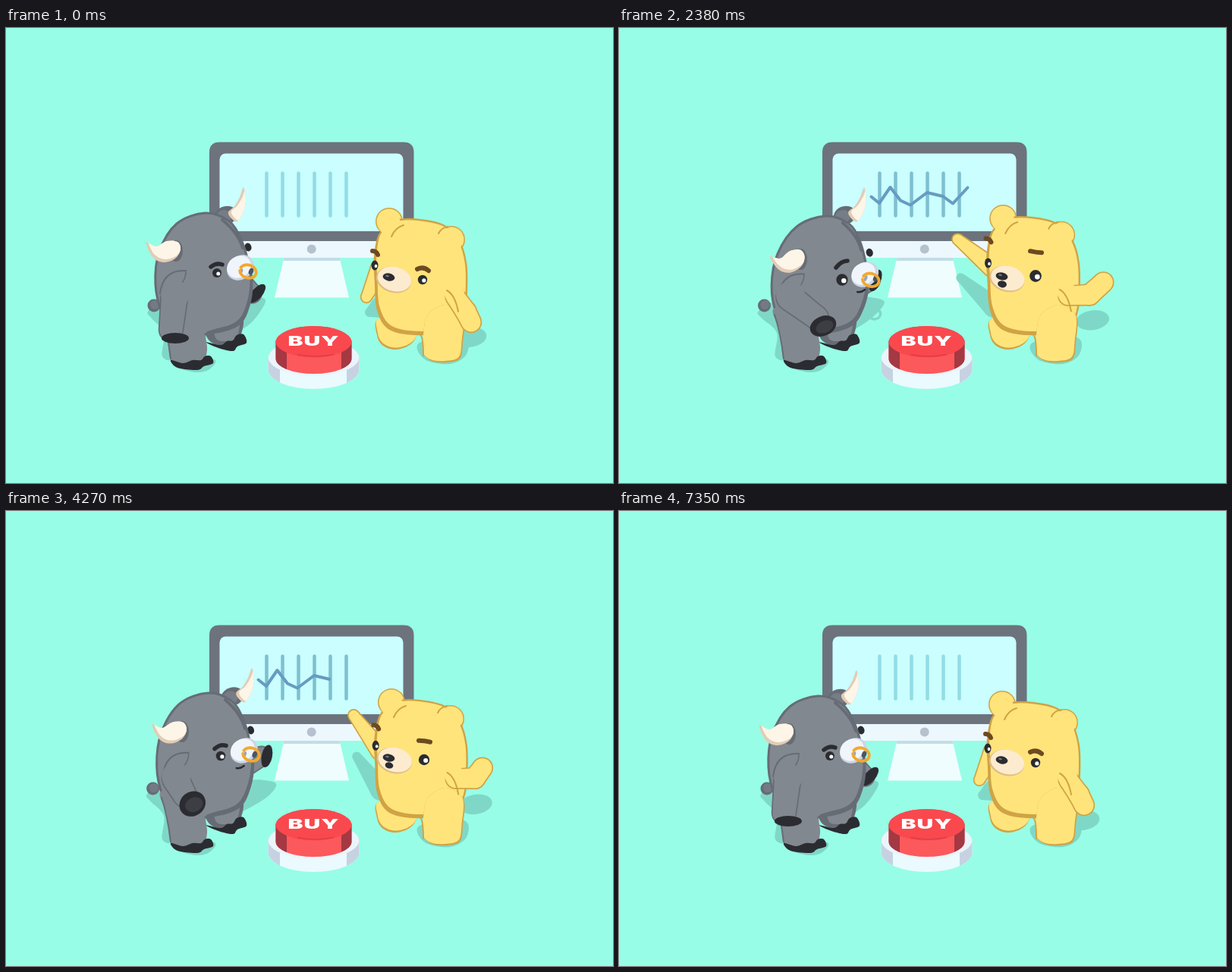
Recreate the animation shown at these times as an HTML page with a canvas. Size 800 by 600 pixels, loop 7420 ms.

```html
<!DOCTYPE html>
<html lang="en">
<head>
<meta charset="utf-8">
<title>Bull and bear</title>
<style>
html, body { margin: 0; width: 100%; height: 100%; overflow: hidden; background: #98fde6; }
svg, canvas { position: absolute; left: 0; top: 0; width: 800px; height: 600px; display: block; }
text { font: 900 30px Inter, "Open Sans", sans-serif; letter-spacing: 1px; }
</style>
</head>
<body>
<svg viewBox="0 0 800 600">
  <defs>
    <clipPath id="baseClip"><path d="M345.500 436a60 26 0 0 1 120 0v14a60 26 0 0 1-120 0z"/></clipPath>
    <clipPath id="capClip"><path d="M355.500 414a50 21 0 0 1 100 0v22a50 20 0 0 1-100 0z"/></clipPath>
  </defs>
  <path d="M367 300h72l13 55.500h-98z" fill="#effdff"/>
  <path d="M366.500 302h73l1.200 5h-75.300z" fill="#c3dde6"/>
  <path d="M268 279h269.500v12q0 12-12 12h-245.500q-12 0-12-12z" fill="#ecf8fe"/>
  <path d="M268 281v-117q0-13.500 13.500-13.500h242.500q13.500 0 13.500 13.500v117z" fill="#6c737d"/>
  <rect x="281.500" y="165.500" width="242" height="102.500" rx="8" fill="#cafeff"/>
  <circle cx="402.700" cy="291.500" r="6" fill="#b6c1ce"/>
  <path id="bars" d="M343.500 191.500v56M364.500 191.500v56M385.500 191.500v56M406.500 191.500v56M427.500 191.500v56M448.500 191.500v56" stroke-width="4.500" stroke-linecap="round"/>
  <path id="line" pathLength="1" d="M332.500 222.500L343 231L357.500 210L371 227.500L384 233.500L406 217L427 222L440 231.500L459.500 210.500" fill="none" stroke="#659cc0" stroke-width="4" stroke-linecap="round" stroke-linejoin="round"/>
  <g clip-path="url(#baseClip)">
    <path d="M345 405h121v75h-121z" fill="#eafaff"/>
    <path d="M345 405h16v75h-16zM449 405h17v75h-17z" fill="#c6d2e2"/>
    <ellipse cx="405.500" cy="434" rx="60" ry="24.500" fill="#eaf4fb"/>
  </g>
  <g clip-path="url(#capClip)">
    <path d="M355 390h101v70h-101z" fill="#fb595c"/>
    <path d="M355 410l15 18v30h-15zM456 410l-14 18v30h14z" fill="#a43843"/>
    <ellipse cx="405.500" cy="413.500" rx="50" ry="21" fill="#f9494e"/>
    <path d="M384 430.500q23 5 48 0" fill="none" stroke="#e03d47" stroke-width="1.500"/>
  </g>
  <text transform="translate(405.500 418.500) scale(1 .6)" text-anchor="middle" fill="#fff">BUY</text>
</svg>
<canvas id="stage" width="800" height="600"></canvas>
<script>
const LOOP = 7420, STEP = 70, END = 7350;
const ctx = document.getElementById('stage').getContext('2d');
const bars = document.getElementById('bars'), line = document.getElementById('line');

const GRAY = '#82888f', SLATE = '#666c75', INK = '#2b2c31';
const YELLOW = '#ffe47b', OCHRE = '#d0a345', SHADOW = '#7fd8c7';
const CREAM = '#fdf5e8', TAN = '#e2ccb6', BROWN = '#6d4a20';

// time, body x y, face x y, brow lift, left horn x y turn, right horn x y turn
const bullHead = [
  [0, 0, 0, 0, 0, -10, 0, 0, 0, 0, 0, 0],
  [980, 10, 4, 8, 19, -8, 18, 9, 0, 18, 0, .28],
  [1400, 12, 6, 9, 20, -8, 19, 10, 0, 19, 1, .3],
  [2380, 10, 4, 16, 9, -21, 15, 11, -.2, 9, 0, .03],
  [2700, 9, 3, 15, 8, -20, 14, 9, -.18, 9, 0, .03],
  [3360, 5, -7, 5, -2, -15, 8, -5, -.08, 10, -6, .03],
  [4300, 4, -4, 5, 0, -12, 8, -3, -.04, 10, -3, .03],
  [5180, 4, 0, 5, 5, -4, 10, 2, 0, 12, 1, .05],
  [5550, 8, 3, 8, 16, -8, 15, 7, 0, 16, 1, .22],
  [6160, 2, 1, 4, 4, -8, 6, 1, 0, 8, 1, .02]
];
// time, near hoof x y height, far hoof x y
const bullArms = [
  [0, 223, 409, 7, 331, 350],
  [980, 223, 409, 7, 331, 346],
  [1550, 223, 409, 7, 331, 346],
  [2380, 269, 393, 13, 338, 333],
  [3360, 249, 381, 17, 348, 319],
  [4200, 246, 386, 16, 344, 323],
  [5180, 232, 399, 12, 332, 340],
  [6160, 225, 407, 8, 331, 348]
];
// time, body x y, left ear x y, right ear x y, face x y, snout y, brow lift, mouth
const bearHead = [
  [0, 0, 0, 0, 0, 0, 0, 0, 0, 0, -15, 0],
  [1550, 0, 0, 0, 0, 0, 0, 0, 0, 0, -15, 0],
  [2250, -1, -3, 1, -4, -4, -6, 0, -5, -1, -32, 1],
  [2700, 0, -3, 2, -4, -3, -7, 0, -5, -2, -31, 1],
  [3360, 2, -4, 5, -5, 0, -7, 2, -6, -5, -26, 1],
  [4250, 1, -3, 3, -3, -1, -5, 2, -4, -3, -25, .9],
  [5180, -8, 3, -16, 14, -9, 9, 4, 9, 16, -6, .5],
  [6160, -5, 2, -12, 9, -7, 6, -1, 11, 13, -13, .4]
];
// time, far hand x y, near elbow x y, near hand x y
const bearArms = [
  [0, 475, 355, 606, 374, 613, 388],
  [1550, 475, 355, 606, 374, 613, 388],
  [2250, 446, 279, 620, 352, 638, 336],
  [2750, 448, 277, 621, 351, 640, 332],
  [3360, 460, 262, 610, 345, 610, 322],
  [4200, 458, 268, 618, 352, 628, 338],
  [5180, 474, 354, 609, 372, 620, 383],
  [6160, 475, 355, 607, 373, 615, 387]
];

const clamp = v => Math.max(0, Math.min(1, v));
const smooth = v => { v = clamp(v); return v * v * (3 - 2 * v); };

function pose(table, t) {
  const i = table.findLastIndex(row => row[0] <= t);
  const a = table[i], b = table[i + 1] || table[0];
  const u = smooth((t - a[0]) / ((table[i + 1] ? b[0] : END) - a[0]));
  return a.slice(1).map((v, k) => v + (b[k + 1] - v) * u);
}

// Leans the upper body while the feet stay put
const leaner = (bx, by) => ([x, y]) => {
  const w = clamp((400 - y) / 150);
  return [x + bx * w, y + by * w];
};
const mover = (x, y, turn = 0, cx = 0, cy = 0) => p => {
  const c = Math.cos(turn), s = Math.sin(turn), dx = p[0] - cx, dy = p[1] - cy;
  return [cx + x + dx * c - dy * s, cy + y + dx * s + dy * c];
};

function blob(points, map = p => p) {
  const pts = points.map(map), n = pts.length, path = new Path2D();
  path.moveTo(...pts[0]);
  for (let i = 0; i < n; i++) {
    const [a, b, c, d] = [n - 1, 0, 1, 2].map(k => pts[(i + k) % n]);
    path.bezierCurveTo(b[0] + (c[0] - a[0]) / 6, b[1] + (c[1] - a[1]) / 6,
      c[0] - (d[0] - b[0]) / 6, c[1] - (d[1] - b[1]) / 6, ...c);
  }
  path.closePath();
  return path;
}

function fill(path, color) { ctx.fillStyle = color; ctx.fill(path); }

function toon(path, light, dark, dx, dy, rim = 0) {
  fill(path, dark);
  ctx.save();
  ctx.clip(path);
  ctx.translate(dx, dy);
  fill(path, light);
  ctx.restore();
  if (rim) { ctx.strokeStyle = dark; ctx.lineWidth = rim; ctx.stroke(path); }
}

function oval(x, y, rx, ry, color, turn = 0) {
  ctx.fillStyle = color;
  ctx.beginPath();
  ctx.ellipse(x, y, rx, ry, turn, 0, 7);
  ctx.fill();
}

function stroke(points, color, width) {
  const [a, b, c] = points;
  ctx.strokeStyle = color;
  ctx.lineWidth = width;
  ctx.lineCap = 'round';
  ctx.beginPath();
  ctx.moveTo(...a);
  ctx.quadraticCurveTo(...b, ...c);
  ctx.stroke();
}

function link([x1, y1, r1], [x2, y2, r2], color) {
  oval(x1, y1, r1, r1, color);
  oval(x2, y2, r2, r2, color);
  const d = Math.hypot(x2 - x1, y2 - y1);
  if (d <= Math.abs(r1 - r2)) return;
  const a = Math.atan2(y2 - y1, x2 - x1), k = Math.acos((r1 - r2) / d);
  ctx.beginPath();
  for (const [x, y, r, s] of [[x1, y1, r1, k], [x2, y2, r2, k], [x2, y2, r2, -k], [x1, y1, r1, -k]])
    ctx.lineTo(x + r * Math.cos(a + s), y + r * Math.sin(a + s));
  ctx.fill();
}

function limb(joints, light, dark) {
  for (const [grow, color] of [[1.7, dark], [0, light]])
    for (let i = 1; i < joints.length; i++)
      link(...[joints[i - 1], joints[i]].map(([x, y, r]) => [x, y, r + grow]), color);
}

function eye(x, y, r) {
  oval(x, y, r, r, INK);
  oval(x + r * .3, y + r * .15, r * .42, r * .42, '#fff');
}

const bullBody = [[262, 244], [293, 254], [309, 277], [319, 307], [324, 335], [320, 366], [306, 391],
  [270, 402], [225, 401], [206, 376], [197, 338], [202, 295], [225, 258]];
const hornLeft = [[185, 283], [198, 288], [212, 281], [226, 282], [230, 292], [223, 304], [207, 309], [193, 302]];
const hornRight = [[313, 210], [316, 227], [313, 242], [305, 255], [297, 251], [293, 243], [301, 235], [308, 223]];

function drawBull(t) {
  const [bx, by, fx, fy, brow, hx, hy, hr, kx, ky, kr] = pose(bullHead, t);
  const [lx, ly, lr, rx, ry] = pose(bullArms, t);
  const lean = leaner(bx, by), tx = 195 - bx * .35;

  fill(blob([[tx - 8, 374], [205, 363], [225, 400], [222, 435], [206, 433], [208, 402], [tx - 3, 383]]), SHADOW);
  fill(blob([[312, 358], [rx + 10, 357 + bx * .2], [rx + 4, 374], [318, 393], [300, 397]]), SHADOW);
  ctx.strokeStyle = SHADOW;
  ctx.lineWidth = 3.5;
  ctx.beginPath();
  ctx.ellipse(319 + fx * 1.1, 377, 8, 7, 0, 0, 7);
  ctx.stroke();
  fill(blob([[228, 436], [274, 437], [268, 450], [250, 454], [226, 447]]), SHADOW);

  oval(tx, 366, 8.5, 8.5, SLATE);
  oval(tx + 1, 365, 6, 6, '#747a83');

  limb([[...lean([308, 338]), 16], [rx - 7, ry, 12]], GRAY, SLATE);
  oval(rx, ry, 7, 15, INK, .12 + clamp((ry - 319) / 40) * .75);
  oval(319 + fx * .7, 289 + fy * .8, 4.5, 5.5, INK, -.3);

  fill(blob([[262, 385], [266, 410], [285, 419], [306, 412], [312, 380], [285, 370]]), SLATE);
  fill(blob([[276, 382], [276, 408], [288, 413], [304, 408], [306, 380]]), GRAY);
  fill(blob([[263, 414], [283, 418], [291, 413], [299, 412], [304, 405], [313, 404], [317, 415],
    [305, 420], [299, 426], [280, 422]]), INK);

  oval(290 + kx * .85, 247 + ky * .8, 15, 12, SLATE, -.3);
  oval(287 + kx * .85, 249 + ky * .8, 10, 9, '#777d86', -.3);
  toon(blob(bullBody, lean), GRAY, SLATE, -2.5, -4, 3);
  stroke([[285, 253], [306, 270], [312, 290]].map(lean), SLATE, 4);
  toon(blob(hornRight, mover(kx, ky, kr, 301, 251)), CREAM, TAN, 4, -1);

  fill(blob([[204, 370], [212, 400], [217, 438], [230, 446], [258, 443], [265, 425], [264, 402], [280, 394], [245, 375]]), GRAY);
  stroke([[263, 404], [272, 398], [296, 394]], SLATE, 3);
  stroke([[205, 378], [213, 402], [217, 436]], SLATE, 2);
  fill(blob([[217, 438], [233, 442], [246, 438], [257, 438], [262, 433], [270, 433], [273, 442],
    [261, 446], [252, 451], [226, 448]]), INK);

  const ear = mover(hx * .45, hy * .4);
  stroke([[203, 350], [207, 318], [237, 320]].map(ear), SLATE, 2);
  stroke([[237, 320], [238, 334], [222, 346]].map(ear), SLATE, 1.5);
  oval(224 + hx, 294 + hy, 9, 14, SLATE);
  toon(blob(hornLeft, mover(hx, hy, hr, 222, 293)), CREAM, TAN, 2, -4);

  const shoulder = lean([222, 354]);
  limb([[...shoulder, 17], [lx - 2 - lr * .5, ly - 11, 15]], GRAY, SLATE);
  oval(shoulder[0] + 1, shoulder[1] - 3, 19, 18, GRAY);
  oval(lx, ly, 18, lr, INK, -(lr - 7) * .07);
  if (lr > 9) oval(lx + 2, ly + 1, 12, lr * .6, '#3d3e44', -.4);

  const mx = 308 + fx * .95, my = 316 + fy;
  oval(mx + 1, my, 19, 15.5, '#ccd6e5', -.6);
  oval(mx - 1, my - 1, 16.5, 14, '#f0f5fb', -.6);
  oval(mx + 15, my + 5, 3, 4.5, '#4b5564', .4);
  oval(mx + 2, my + 5, 2, 4, '#9aa6b8', .3);
  ctx.globalAlpha = clamp(Math.hypot(fx, fy) / 5);
  stroke([[mx - 9, my + 23], [mx - 4, my + 24], [mx + 1, my + 20]], INK, 2.5);
  ctx.globalAlpha = 1;
  ctx.strokeStyle = '#f2a92f';
  ctx.lineWidth = 3.8;
  ctx.beginPath();
  ctx.ellipse(319 + fx * .8, 321 + fy * 1.25, 11, 8.5, .3, -2.9, 2.9);
  ctx.stroke();

  const ex = 278 + fx, ey = 323 + fy;
  eye(ex, ey, 6 + Math.max(0, -brow - 10) * .15);
  const tilt = clamp((-brow - 10) / 10) * 3;
  stroke([[ex - 8, ey + brow + 2 + tilt], [ex - 1, ey + brow - 4], [ex + 7, ey + brow - 1 - tilt]], INK, 5.5);
}

const bearBody = [[545, 253], [578, 261], [598, 283], [606, 310], [607, 342], [604, 374], [590, 398],
  [545, 404], [506, 397], [490, 372], [487, 335], [486, 302], [493, 271], [515, 254]];

function drawBear(t) {
  const [bx, by, ax, ay, gx, gy, fx, fy, sy, brow, open] = pose(bearHead, t);
  const [lx, ly, jx, jy, rx, ry] = pose(bearArms, t);
  const lean = leaner(bx, by);

  link([494, 368, 14], [lx + 4, ly * .6 + 162, 6], SHADOW);
  oval((600 + rx) / 2 + 5, 408 + (ry - 388) * .43, 22, 13, SHADOW, -.15);
  fill(blob([[545, 415], [603, 408], [607, 430], [585, 443], [552, 437]]), SHADOW);

  limb([[...lean([493, 318]), 12], [lx, ly, 6.5]], YELLOW, OCHRE);

  const legLeft = blob([[492, 383], [489, 405], [497, 419], [514, 424], [532, 418], [541, 406], [545, 385]]);
  toon(legLeft, YELLOW, OCHRE, 1, -2.5);
  const earR = [587 + gx, 279 + gy], earL = [505 + ax, 255 + ay];
  for (const [x, y] of [earL, earR]) {
    oval(x, y, 18, 18, OCHRE);
    oval(x, y, 16.5, 16.5, YELLOW);
  }
  toon(blob(bearBody, lean), YELLOW, OCHRE, 2.5, -4, 2.4);
  oval(...earL.map((v, i) => v + 3 * i), 15, 15, YELLOW);
  oval(...earR, 15.5, 16, YELLOW);
  stroke([[earL[0] + 3, earL[1] + 20], [earL[0] + 8, earL[1] + 8], [earL[0] + 19, earL[1] + 5]], OCHRE, 2);
  stroke([[earR[0] - 17, earR[1] - 8], [earR[0] - 14, earR[1] - 15], [earR[0] - 5, earR[1] - 17]], OCHRE, 2);

  toon(blob([[556, 378], [550, 405], [550, 428], [561, 439], [580, 441], [598, 436], [602, 415], [603, 380], [580, 365]]),
    YELLOW, OCHRE, -1.5, -2);
  stroke([[545, 404], [550, 405], [550, 432]], OCHRE, 2);

  const shoulder = lean([592, 354]);
  limb([[...shoulder, 12], [jx, jy, 13], [rx, ry, 12.5]], YELLOW, OCHRE);
  oval(shoulder[0] - 1, shoulder[1] - 4, 13, 13, YELLOW);
  stroke([[581, 346], [592, 352], [596, 374]].map(lean), OCHRE, 2);

  // Far eye and brow sit on the edge of the head
  const farX = 486 + (sy > 0 ? -sy * .3 : -sy * .4);
  const farY = 313 + sy * .9 + Math.min(0, fy + 3);
  oval(farX, farY, 4.5, 6.5, INK);
  oval(farX + 1.5, farY + 1, 1.8, 2.2, '#fff');
  const farBrow = farY + (brow + 15) * .8 - 17;
  stroke([[farX - 3, farBrow - 2], [farX + 2, farBrow - 2], [farX + 4, farBrow + 3]], BROWN, 6);

  const mx = 512 + clamp(Math.abs(sy) / 8) * 2, my = 331 + sy;
  oval(mx - 1, my + 1, 23.5, 17, '#e0bd86', .25);
  oval(mx, my, 22.5, 16, '#fdebcf', .25);
  oval(504.500, 328.500 + sy, 8, 5, INK, .2);
  oval(502.500, 327 + sy, 2.5, 1.2, '#77787c', .2);
  if (open > .02) oval(505, 333 + sy + open * 6, 6 * open, 4.5 * open, INK, .2);

  const ex = 549 + fx, ey = 332 + fy;
  eye(ex, ey, 6.2 + Math.max(0, -brow - 15) * .1);
  const arch = clamp((-brow - 15) / 15) * 4;
  stroke([[ex - 7, ey + brow + 1 - arch * .5], [ex + 1, ey + brow - 3 + arch], [ex + 8, ey + brow + 3 - arch * .5]], BROWN, 6);
}

function drawChart(t) {
  const trip = 3460, time = 1200;
  const local = t < 3470 ? t : t - trip;
  const head = smooth((local - 20) / time), tail = smooth((local - 2400) / time);
  const shown = head - tail;
  line.style.display = shown > .004 ? '' : 'none';
  line.setAttribute('stroke-dasharray', `${Math.max(shown, 0)} 2`);
  line.setAttribute('stroke-dashoffset', -tail);
  const k = clamp(shown * 3);
  bars.setAttribute('stroke', `rgb(${146 - 20 * k},${220 - 28 * k},${230 - 22 * k})`);
}

function frame(now) {
  const t = Math.floor(now % LOOP / STEP) * STEP;
  ctx.clearRect(0, 0, 800, 600);
  drawChart(t);
  drawBull(t);
  drawBear(t);
  requestAnimationFrame(frame);
}
frame(0);
</script>
</body>
</html>
```
